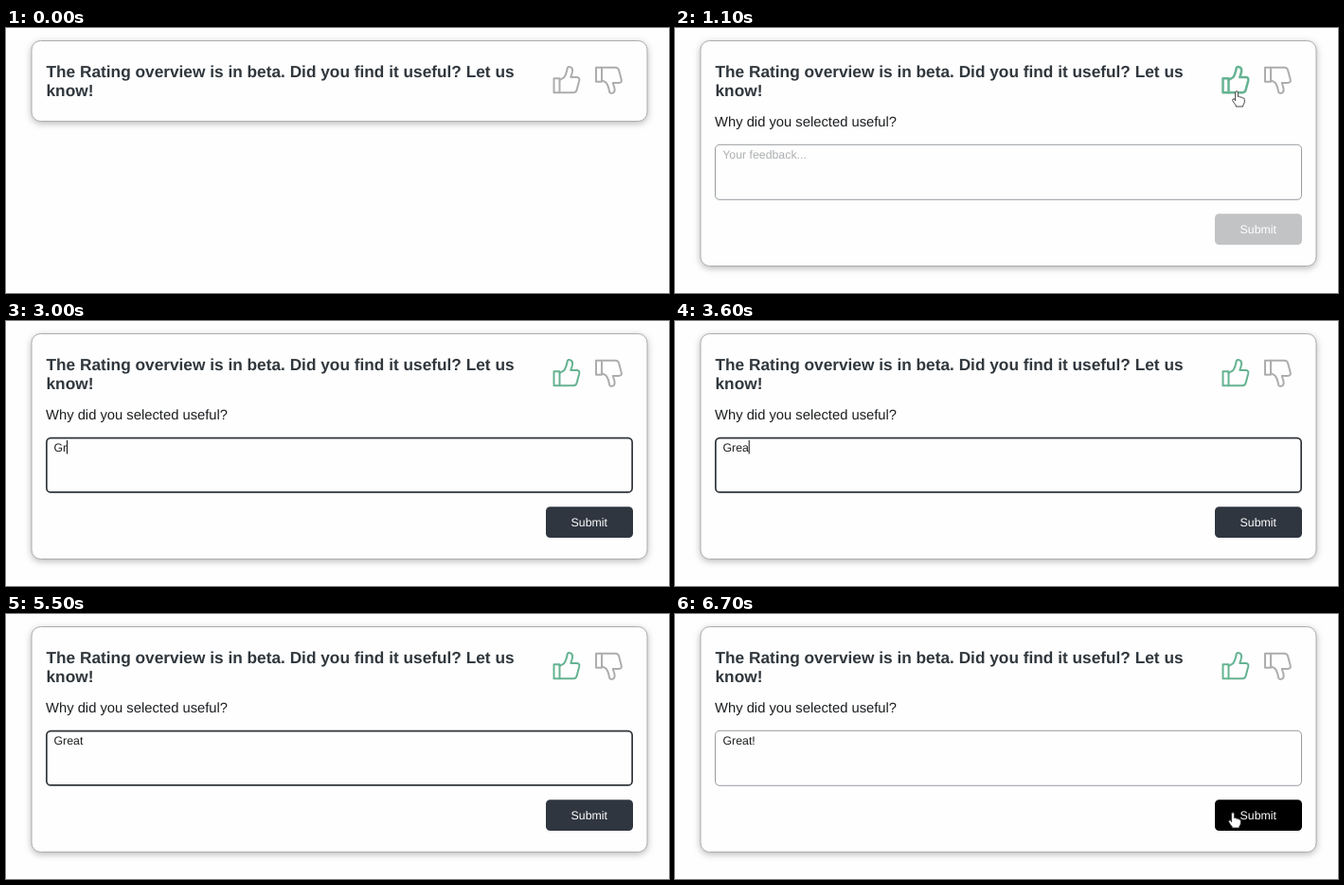
Recreate the animation shown at these times as an HTML page. Size 700 by 280 pixels, loop 8000 ms.

```html
<!DOCTYPE html>
<html lang="en">
<head>
<meta charset="utf-8">
<title>Feedback card</title>
<style>
  html, body { margin: 0; width: 100%; height: 100%; overflow: hidden; background: #fefefe; }
  svg { display: block; width: 700px; height: 280px; }
  text { font-family: "Liberation Sans", Arial, sans-serif; text-rendering: geometricPrecision; white-space: pre; }
  .title { font-size: 17.27px; font-weight: bold; fill: #30373d; }
  .ask { font-size: 14.78px; fill: #1c1e20; }
  .field { font-size: 12.33px; }
  #card { fill: #fefefe; stroke: #acacac; filter: drop-shadow(0 2px 3.5px rgba(0, 0, 0, .27)); }
  .icon { fill: none; stroke: #adadad; stroke-width: 2; stroke-linejoin: round; stroke-linecap: round; }
  #cursor path { stroke-linejoin: round; stroke-linecap: round; }
</style>
</head>
<body>
<svg viewBox="0 0 700 280">
  <defs>
    <g id="thumb">
      <rect x="578.5" y="53.2" width="6" height="15"/>
      <path d="M584.5 55L589 52.3C591.4 50 592 46 592.8 42C594 40.2 598.6 40.8 598.1 45.5C597.8 48 596.8 50 596.3 52H602.5Q605.8 52 605.3 55.2L602.6 65.4Q601.8 68.2 599 68.2H584.5"/>
    </g>
  </defs>
  <rect id="card" x="27" y="13.5" width="650" height="85" rx="9.5"/>
  <text class="title" x="42.5" y="52">The Rating overview is in beta. Did you find it useful? Let us</text>
  <text class="title" x="42.5" y="72">know!</text>
  <use id="up" class="icon" href="#thumb"/>
  <use class="icon" href="#thumb" transform="matrix(1 0 0 -1 44.5 110)"/>
  <g id="form">
    <text class="ask" x="42" y="104">Why did you selected useful?</text>
    <rect id="box" rx="4.5" fill="#fefefe"/>
    <text id="hint" class="field" x="50.2" y="137.5" fill="#adafb1">Your feedback...</text>
    <text id="typed" class="field" x="50.5" y="137.5" fill="#202224"></text>
    <path id="caret" stroke="#111"/>
    <rect id="button" x="570" y="196.2" width="92" height="32.8" rx="4.5"/>
    <text class="field" x="596.6" y="216.5" fill="#fff">Submit</text>
  </g>
  <g id="cursor">
    <path id="hand" fill="#fff" stroke="#333" stroke-width=".9" d="M-1.4 9.4V1.2Q-1.3 -.2 0 -.2Q1.4 -.2 1.4 1.2V5.6Q2.7 4.7 3.9 6.2Q5.2 5.4 6.2 6.9Q8.2 6.4 8.3 8.6V11.2Q8.1 13.4 6.8 14.4V16H-.8V14.7Q-2.6 12.8 -4.4 9.4Q-4.6 7.6 -2.8 7.8Z"/>
    <path id="arrow" fill="#fff" stroke="#222" stroke-width=".9" d="M0 0V14L3.2 11.2L5.3 16L7.5 15L5.4 10.4H9.8Z"/>
    <path id="beam" fill="none" stroke="#333" d="M-2.5 -7.5H2.5M0 -7.5V7.5M-2.5 7.5H2.5"/>
  </g>
</svg>
<script>
const LOOP = 8000, STEP = 100;
const $ = id => document.getElementById(id);
const set = (id, attrs) => {
  for (const k in attrs) $(id).setAttribute(k, attrs[k]);
};
const show = (id, on) => set(id, { visibility: on ? "inherit" : "hidden" });
const within = (t, a, b) => t >= a && t < b;

const OPEN = 1100, FOCUS = 1600, BLUR = 6600;
const keys = [[2700, "G"], [3000, "r"], [3200, "e"], [3600, "a"], [4000, "t"], [6100, "!"]];
const moves = [
  [[100, 566, 212], [400, 586, 124], [800, 593, 67], [1100, 593, 67], [1400, 540, 150], [2100, 540, 150]],
  [[6300, 562, 178], [6400, 583, 206], [6700, 589, 210], [LOOP, 589, 210]]
];
const shades = [
  [2700, [194, 195, 196]], [2850, [47, 54, 64]],
  [6300, [47, 54, 64]], [6400, [19, 21, 29]], [6500, [0, 0, 0]]
];

// Piecewise linear value of [time, ...values] rows
function sample(rows, t) {
  if (t <= rows[0][0]) return rows[0].slice(1);
  const i = rows.findIndex(r => r[0] > t);
  if (i < 0) return rows[rows.length - 1].slice(1);
  const a = rows[i - 1], b = rows[i], p = (t - a[0]) / (b[0] - a[0]);
  return a.slice(1).map((v, k) => v + (b[k + 1] - v) * p);
}

const colors = shades.map(([t, rgb]) => [t, ...rgb]);

function caretOn(t) {
  const last = keys.reduce((m, k) => k[0] <= t ? k[0] : m, FOCUS);
  return within(t, FOCUS, BLUR) && Math.floor((t - last) / 500) % 2 === 0;
}

function drawCursor(t, open) {
  const run = moves.find(r => within(t, r[0][0], r[r.length - 1][0]));
  show("cursor", run);
  if (!run) return false;
  const [x, y] = sample(run, t);
  const onThumb = within(x, 572, 612) && within(y, 36, 77);
  const onButton = open && x >= 570 && within(y, 196, 229);
  const onBox = open && within(y, 123, 182);
  set("cursor", { transform: `translate(${x} ${y})` });
  show("hand", onThumb || onButton);
  show("beam", onBox);
  show("arrow", !onThumb && !onButton && !onBox);
  return onThumb;
}

function draw(time) {
  const t = Math.floor(time / STEP) * STEP;
  const open = t >= OPEN, focus = within(t, FOCUS, BLUR);
  const text = keys.filter(k => k[0] <= t).map(k => k[1]).join("");

  set("card", { height: open ? 238 : 85 });
  show("form", open);
  const hover = drawCursor(t, open);
  $("up").style.stroke = open || hover ? "#65b392" : "";
  $("up").style.strokeWidth = hover ? 2.5 : 2;

  const line = focus ? 1.7 : 1;
  set("box", {
    x: 42 + line / 2, y: 122.8 + line / 2, width: 620 - line, height: 59 - line,
    stroke: focus ? "#30353a" : "#989ca0", "stroke-width": line
  });
  show("hint", open && !text);
  $("typed").textContent = text;
  const x = 50.8 + (text ? $("typed").getComputedTextLength() : 0);
  set("caret", { d: `M${x} 126V140.5` });
  show("caret", caretOn(t));
  set("button", { fill: `rgb(${sample(colors, t).map(Math.round)})` });
}

const start = performance.now();
function tick() {
  draw((performance.now() - start) % LOOP);
  requestAnimationFrame(tick);
}
tick();
</script>
</body>
</html>
```
